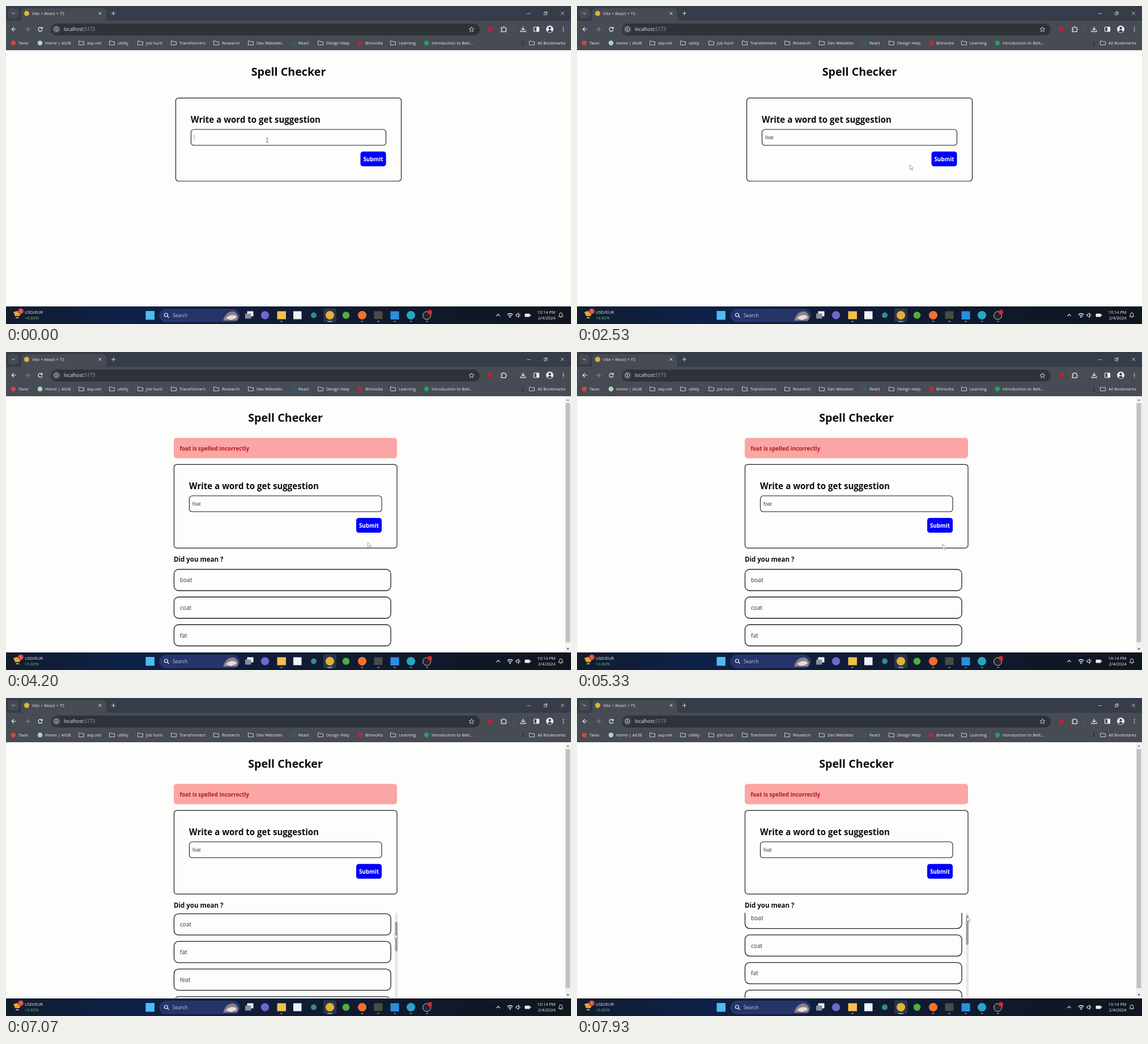
Write an HTML page with a canvas that moves like this. It is 997 px wide and 561 px high and loops after 8 s.

```html
<!DOCTYPE html>
<html lang="en">
<head>
<meta charset="utf-8">
<title>Spell Checker</title>
<style>
  html, body { margin: 0; width: 100%; height: 100%; overflow: hidden; background: #fdfdfc; }
  canvas { display: block; }
</style>
</head>
<body>
<canvas id="stage" width="997" height="561"></canvas>
<script>
const ctx = document.getElementById('stage').getContext('2d');
const SANS = '"Open Sans", "Noto Sans", sans-serif';
const INPUT_FONT = '"Liberation Sans", Arial, sans-serif';
const LOOP = 8000, FPS = 15;
const WORDS = ['boat', 'coat', 'fat', 'feat', 'float', 'flat', 'foam', 'foot', 'fort', 'goat', 'moat'];
const PAGE = '#fdfdfc', INK = '#1b1b24', DARK = '#0c0c10', ICON = '#dcdee4', BAR = '#474b54';

// ---------- drawing helpers ----------
function text(s, x, y, size, color, weight = 400, align = 'left', family = SANS) {
  ctx.font = `${weight} ${size}px ${family}`;
  ctx.textAlign = align;
  ctx.fillStyle = color;
  ctx.fillText(s, x, y);
}
function rect(x, y, w, h, color) {
  ctx.fillStyle = color;
  ctx.fillRect(x, y, w, h);
}
function round(x, y, w, h, r, fill, stroke, line = 1) {
  ctx.beginPath();
  ctx.roundRect(x, y, w, h, r);
  if (fill) { ctx.fillStyle = fill; ctx.fill(); }
  if (stroke) { ctx.strokeStyle = stroke; ctx.lineWidth = line; ctx.stroke(); }
}
function dot(x, y, r, fill, stroke, line = 1) {
  ctx.beginPath();
  ctx.arc(x, y, r, 0, Math.PI * 2);
  if (fill) { ctx.fillStyle = fill; ctx.fill(); }
  if (stroke) { ctx.strokeStyle = stroke; ctx.lineWidth = line; ctx.stroke(); }
}
function path(d, x, y, stroke, line = 1, fill) {
  const p = new Path2D(d);
  ctx.save();
  ctx.translate(x, y);
  if (fill) { ctx.fillStyle = fill; ctx.fill(p); }
  if (stroke) { ctx.strokeStyle = stroke; ctx.lineWidth = line; ctx.stroke(p); }
  ctx.restore();
}

// ---------- timing helpers ----------
const clamp = v => Math.max(0, Math.min(1, v));
const easeOut = v => 1 - (1 - clamp(v)) ** 2;
// keys: [time, ...values]
function track(keys, t) {
  let i = 0;
  while (i < keys.length - 1 && t >= keys[i + 1][0]) i++;
  const a = keys[i], b = keys[Math.min(i + 1, keys.length - 1)];
  const u = b === a ? 0 : clamp((t - a[0]) / (b[0] - a[0]));
  return a.slice(1).map((v, n) => v + (b[n + 1] - v) * u);
}

// ---------- browser ----------
function browserBar() {
  rect(0, 0, 997, 27, '#363c48');
  rect(0, 26, 997, 52, BAR);
  round(4, 4, 18, 18, 5, '#454a55');
  path('M-2.5-1.2L0 1.3L2.5-1.2', 13, 13, ICON);
  round(27, 4, 150, 24, [6, 6, 0, 0], BAR);
  dot(36.5, 13, 4.5, '#d5b83c');
  text('Vite + React + TS', 46, 16, 7.5, '#e6e6ec');
  path('M-2.5-2.5L2.5 2.5M2.5-2.5L-2.5 2.5', 166, 13, ICON);
  path('M-3.5 0H3.5M0-3.5V3.5', 189.5, 13, ICON);
  path('M-3 0H3', 922.5, 13.5, ICON, 0.8);
  path('M-2.5-1.5H1.5V2.5H-2.5ZM-1-1.5V-3H3V1H1.5', 952, 13.2, ICON, 0.8);
  path('M-3-3L3 3M3-3L-3 3', 982, 13, ICON, 0.8);

  path('M4 0H-3.5M0-3.7L-3.7 0L0 3.7', 14, 41, '#eeeef2', 1.2);
  path('M-4 0H3.5M0-3.7L3.7 0L0 3.7', 37.5, 41, '#868a92', 1.1);
  path('M3 -1.8A3.5 3.5 0 1 0 3.4 1.2M3.6-4V-1.2H.8', 60.5, 41, '#eeeef2', 1.2);
  round(79, 31, 757, 21, 10.5, '#2e3339');
  dot(89, 41, 7.5, '#434850');
  dot(89, 41, 3.7, null, ICON, 0.9);
  path('M0-.5V2M0-2.1V-1.2', 89, 41, ICON);
  text('localhost:', 102, 44.3, 8.2, '#e8e8ec');
  text('5173', 102 + ctx.measureText('localhost:').width, 44.3, 8.2, '#a3a6ac');
  path('M0-4.3L1.3-1.4L4.4-1.1L2 .9L2.8 4L0 2.3L-2.8 4L-2 .9L-4.4-1.1L-1.3-1.4Z', 821.5, 41.2, ICON, 0.9);
  dot(854.5, 41, 4.3, '#bb2430');
  path('M-4-3H-1.2A1.3 1.3 0 0 1 1.4-3H4V-.8A1.4 1.4 0 0 1 4 1.9V4.3H-4V2A1.4 1.4 0 0 0-4-.8Z', 878, 41, '#eeeef2', 1.2);
  rect(895, 36, 1, 10, '#565a66');
  path('M0-4.5V1.5M-3-1.3L0 1.7L3-1.3M-4.3 1.8V4.2H4.3V1.8', 912.5, 41, '#eeeef2', 1.2);
  round(931.5, 37, 9, 8, 1, null, '#eeeef2', 1.2);
  rect(936, 37, 4.5, 8, '#eeeef2');
  dot(959.5, 41, 6.5, '#e6e8f2');
  dot(959.5, 39, 2.2, '#34405c');
  path('M-4 3.6Q0-2.6 4 3.6Q0 6.5-4 3.6Z', 959.5, 41.6, null, 0, '#34405c');
  for (const dy of [-3.3, 0, 3.3]) dot(983.5, 41 + dy, 0.9, '#eeeef2');
}

// [label, text x, icon colour or nothing for a folder]
const BOOKMARKS = [
  ['Tavio', 22, '#d0483e'], ['Home | AIUB', 69, '#a9d8c0'], ['asp.net', 143], ['utility', 197],
  ['job hunt', 247], ['Transformers', 306], ['Research', 381], ['Dev Websites', 442],
  ['React', 516, '#2b5f6c'], ['Design Help', 565], ['Brinvolta', 634, '#b32a3c'], ['Learning', 693],
  ['Introduction to Bett...', 751, '#22a35a'], ['All Bookmarks', 938]
];
function bookmarks() {
  for (const [label, x, color] of BOOKMARKS) {
    if (color) dot(x - 9, 65.3, 4.2, color);
    else path('M-4.5-3.2H-1.3L0-2H4.5V3.6H-4.5Z', x - 10, 65, ICON, 0.9);
    text(label, x, 68, 7.35, '#ececf0');
  }
  rect(911.5, 61, 1, 9, '#1c1f26');
}

// ---------- taskbar ----------
function taskbar() {
  const g = ctx.createLinearGradient(0, 0, 997, 0);
  g.addColorStop(0, '#111c2e');
  g.addColorStop(0.22, '#0e2149');
  g.addColorStop(0.45, '#101c38');
  g.addColorStop(1, '#10161f');
  rect(0, 530, 997, 31, g);
  path('M-7-3L-1-5L6-1L4 4L-4 4ZM-4 8L0 5L4 8', 20, 543, null, 0, '#e7a52b');
  dot(26, 538.5, 5, '#d8453c');
  text('1', 26, 541.2, 7, '#fff', 400, 'center');
  text('USD/EUR', 33, 542.7, 7.5, '#f2f2f6');
  text('+0.80%', 33, 553, 7.3, '#58c564');

  rect(246.5, 538, 15.5, 15.5, '#4cbcf0');
  round(271, 535, 141, 22, 11, '#25356a', '#3a4878', 0.8);
  dot(282.5, 545, 3, null, '#f0f0f5', 1.2);
  path('M2.2 2.2L5 5', 282.5, 545, '#f0f0f5', 1.2);
  text('Search', 294, 549, 8.4, '#c6cae0');
  path('M-14 9Q-10-5 0-7Q9-9 13 2L11 9Z', 397, 546, null, 0, '#8d7f86');
  path('M-9 5Q-2-3 8 0L10 4L0 8Z', 397, 546, null, 0, '#e4ded9');

  rect(425.5, 538.5, 11, 9, '#f0f0f5');
  rect(422, 542.5, 10.5, 9, '#8b8d9a');
  dot(457, 545.5, 7.2, '#7266cf');
  rect(478.5, 538.5, 15.5, 14, '#f2c14a');
  rect(507, 538.5, 14.5, 14, '#eff1f6');
  dot(543, 545.5, 5, '#2e8f83');
  round(560, 533.5, 23, 24, 3, '#2d3446');
  dot(571.5, 545.5, 7.6, '#dfb13a');
  dot(600, 545.5, 6.3, '#4fae3c');
  dot(628.5, 545.5, 7.6, '#f2702f');
  rect(649.5, 538.5, 15, 13.5, '#4a4b42');
  rect(678.5, 538.5, 15, 14.5, '#2a8fe0');
  dot(714.5, 545.5, 7.6, '#27a5c4');
  dot(742.5, 546, 7, '#25252c', '#c9c9d2', 1);
  dot(748, 540.2, 4, '#e0252c');
  for (const x of [486, 628.5, 657, 686, 714.5, 743]) round(x - 2, 555.8, 4, 1.5, 0.7, '#9a9cab');
  round(567, 555.8, 9, 1.6, 0.8, '#67bdf0');

  path('M-3.2 1.6L0-1.6L3.2 1.6', 868.5, 545.5, '#f0f0f5', 1.1);
  path('M-4.8-1.6Q0-6 4.8-1.6M-3 .7Q0-2 3 .7', 889.5, 546.3, '#f0f0f5', 1.2);
  dot(889.5, 548.8, 1.3, '#f0f0f5');
  path('M-4-1.5H-2L.5-4V4L-2 1.5H-4ZM2.2-2Q3.6 0 2.2 2', 904, 545.5, '#f0f0f5', 1);
  round(915.5, 542.8, 9, 5.6, 1.2, '#f0f0f5');
  rect(925, 544.4, 1.2, 2.4, '#f0f0f5');
  text('10:14 PM', 969.5, 542.7, 7.4, '#f2f2f6', 400, 'right');
  text('2/4/2024', 969.5, 553, 7.4, '#f2f2f6', 400, 'right');
  path('M-4 2.6Q-2.6 1.4-2.6-1A2.6 3 0 0 1 2.6-1Q2.6 1.4 4 2.6ZM-1.2 4H1.2', 979, 545.2, '#f0f0f5', 0.9);
}

// ---------- page ----------
const TYPED = [1200, 1266, 1400, 1533];
function caretOn(t) {
  return t < 530 || (t >= 1060 && t < 2060) || (t >= 2595 && t < 3060);
}

function card(t, x, y, w, h) {
  round(x, y, w, h, 5, null, INK, 1.2);
  text('Write a word to get suggestion', x + 26.5, y + 44, 15.05, DARK, 700);
  round(x + 27, y + 55.5, w - 54, 28, 5, PAGE, INK, 1.1);
  const value = 'foat'.slice(0, TYPED.filter(k => t >= k - 5).length);
  text(value, x + 32.5, y + 72.5, 8.65, '#3c3c40', 400, 'left', INPUT_FONT);
  if (caretOn(t)) rect(Math.round(x + 32.5 + ctx.measureText(value).width), y + 64.5, 1, 9.5, '#aaa99a');
  round(x + w - 72, y + 94.5, 45, 26, 4.5, '#0000fa');
  text('Submit', x + w - 49.5, y + 111.3, 9.9, '#fff', 700, 'center');
}

function pageScrollbar() {
  rect(986, 78, 11, 452, '#f3f3f2');
  rect(987.5, 90, 8, 422, '#c2c2c4');
  path('M-2.5 1.5L0-1.5L2.5 1.5Z', 991.5, 84.5, null, 0, '#85858a');
  path('M-2.5-1.5L0 1.5L2.5-1.5Z', 991.5, 524, null, 0, '#55555a');
}

function results(t, thumb, hover) {
  ctx.globalAlpha = 0.08 + 0.92 * easeOut((t - 3600) / 330);
  round(296, 151.5, 394, 36, 5, '#fca5a5');
  text('foat is spelled incorrectly', 306.5, 173.5, 9.75, '#b01c20', 700);
  ctx.globalAlpha = 1;
  text('Did you mean ?', 296, 370, 11.5, DARK, 700);

  ctx.save();
  ctx.beginPath();
  ctx.rect(290, 379, 402, 150);
  ctx.clip();
  WORDS.forEach((word, i) => {
    const p = easeOut((t - 3580 - Math.min(i, 3) * 100) / 340);
    const y = 383.5 + i * 48.75 - thumb * 3.2, x = 296.5 - 3 * (1 - p);
    if (y > 530 || y < 335) return;
    ctx.globalAlpha = p;
    round(x, y, 382.5, 37.5, 8, PAGE, INK, 1.3);
    text(word, x + 10.5, y + 22.7, 10.1, '#34343e');
  });
  ctx.globalAlpha = 1;
  if (hover) {
    rect(686.5, 379, 4.5, 151, '#e6e6e4');
    round(686.5, 379 + thumb, 4.5, 52, 2, '#9d9da0');
  }
  ctx.restore();
}

// ---------- pointer ----------
const POINTER = [
  [0, 461, 237], [2266, 461, 237], [2400, 520, 255], [2533, 587.5, 280], [2733, 612, 284],
  [2800, 612, 284], [2933, 634, 277], [3066, 645, 272], [3200, 645, 274], [3400, 638.5, 336],
  [5266, 638.5, 336], [5600, 672, 352], [5933, 708, 384], [6000, 708, 384], [6266, 679.5, 395],
  [6533, 684, 401], [6800, 686, 400], [6933, 686, 400], [7066, 686, 416], [7333, 687, 458],
  [7466, 687, 462], [7800, 687.5, 396], [7933, 688, 386]
];
const THUMB = [[0, 0], [6933, 0], [7066, 16], [7333, 58], [7466, 62], [7800, 12], [7933, 4.5]];

function pointer(x, y, overInput) {
  if (overInput) {
    path('M-2-4H-.5L0-3.5L.5-4H2M0-3.5V3.5M-2 4H-.5L0 3.5L.5 4H2', x, y, '#55555a', 0.9);
  } else {
    path('M0 0V8.6L2 6.9L3.4 9.8L4.6 9.2L3.4 6.4L6 6.2Z', x, y, '#85859a', 0.8, '#fff');
  }
}

// ---------- frame ----------
function draw(t) {
  const done = t >= 3595;
  const [mx, my] = track(POINTER, t);
  const [thumb] = track(THUMB, t);
  rect(0, 0, 997, 561, PAGE);
  text('Spell Checker', done ? 493 : 498.5, 123, 19.7, DARK, 700, 'center');
  if (done) {
    results(t, thumb, mx < 692 && my >= 379);
    card(t, 296.5, 198.3, 393.5, 147.5);
    pageScrollbar();
  } else {
    card(t, 299.5, 162.3, 398, 146.7);
  }
  browserBar();
  bookmarks();
  taskbar();
  pointer(mx, my, !done && my > 217 && my < 246 && mx < 670);
}

const start = performance.now();
function tick() {
  const t = (performance.now() - start + 5) % LOOP;
  draw(Math.floor(t * FPS / 1000) * 1000 / FPS);
  requestAnimationFrame(tick);
}
tick();
</script>
</body>
</html>
```
